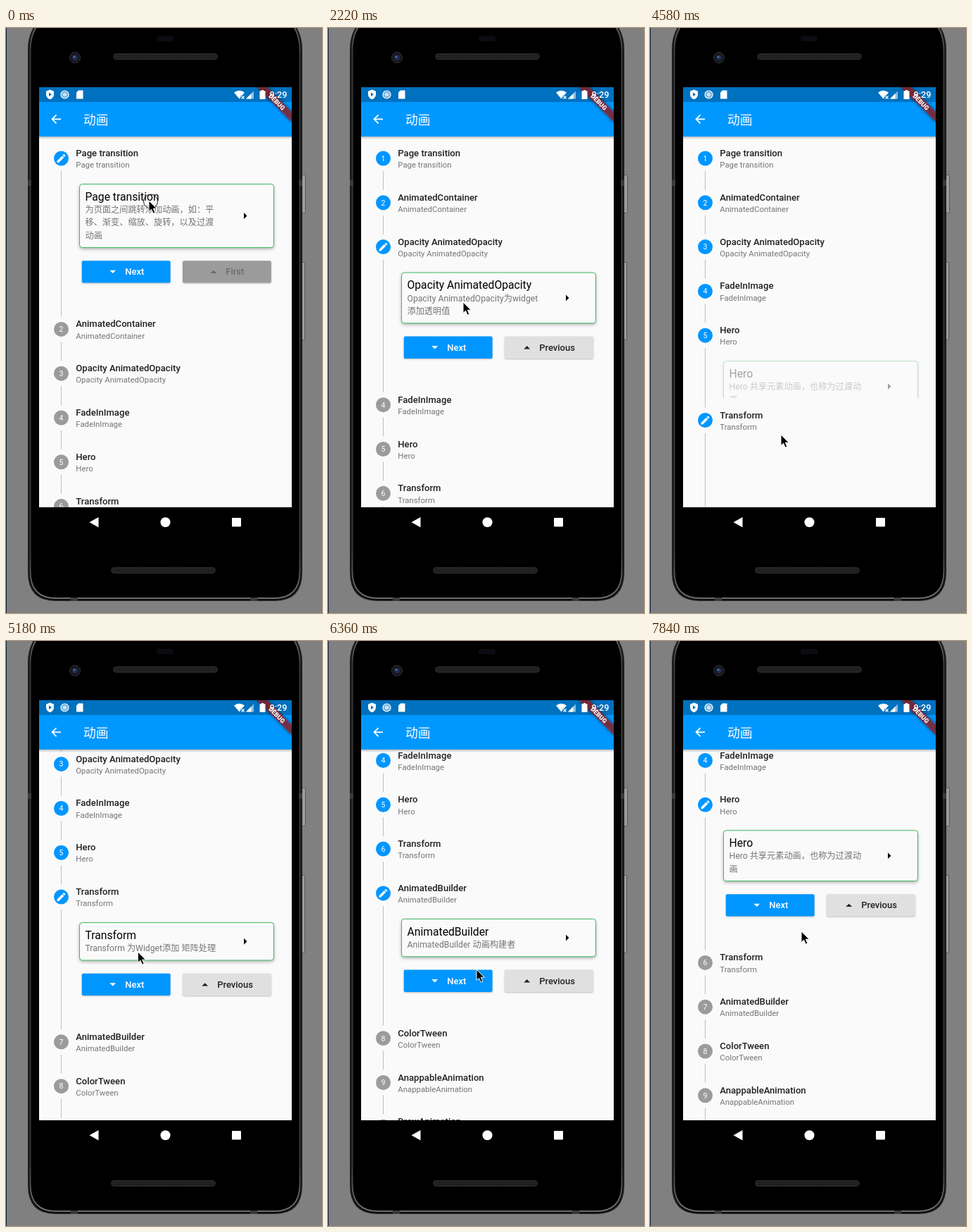
Write an HTML page that moves like this. It is 449x830 px and loops after 7990 ms.

```html
<!DOCTYPE html>
<html lang="zh-CN">
<head>
<meta charset="utf-8">
<title>Stepper</title>
<style>
  html, body { margin: 0; width: 100%; height: 100%; overflow: hidden; background: #808080; }
  svg { display: block; font-family: Roboto, 'Noto Sans CJK SC', 'Noto Sans CJK', sans-serif; }
  .head { font-size: 13.1px; font-weight: 500; fill: #212121; }
  .sub { font-size: 11.36px; fill: #757575; }
  .num { font-size: 10.5px; fill: #fff; text-anchor: middle; }
  .title { font-size: 15.7px; fill: #000; }
  .note { font-size: 12.2px; fill: #757575; }
  .label { font-size: 13px; font-weight: 500; }
  .card { fill: #fafafa; stroke: #3dba62; filter: drop-shadow(0 2px 2px rgba(0,0,0,.28)); }
  .raised { filter: drop-shadow(0 1.2px 1px rgba(0,0,0,.25)); }
  .glow { filter: blur(2.5px); }
</style>
</head>
<body>
<svg width="449" height="830" viewBox="0 0 449 830">
  <defs>
    <clipPath id="page"><rect x="47" y="154" width="359" height="526"/></clipPath>
    <clipPath id="screen"><rect x="47" y="84" width="359" height="596"/></clipPath>
    <linearGradient id="shade" x2="0" y2="1">
      <stop stop-opacity=".24"/><stop offset="1" stop-opacity="0"/>
    </linearGradient>
    <linearGradient id="rim" x2="0" y2="1">
      <stop stop-color="#6a6a6a"/><stop offset=".06" stop-color="#3c3c3c"/>
      <stop offset=".92" stop-color="#3c3c3c"/><stop offset="1" stop-color="#707070"/>
    </linearGradient>
    <pattern id="mesh" width="3" height="3" patternUnits="userSpaceOnUse">
      <rect width="3" height="3" fill="#1c1c1c"/><circle cx="1.5" cy="1.5" r=".8" fill="#333"/>
    </pattern>
  </defs>

  <!-- phone -->
  <rect width="1" height="830" fill="#14233f"/>
  <g fill="#9c9c9c" stroke="#444" stroke-width=".7">
    <rect x="420.5" y="208.5" width="5" height="54" rx="1"/>
    <rect x="420.5" y="332.5" width="4" height="110" rx="1"/>
  </g>
  <path d="M49-12Q32 5 32 30V772Q32 812 70 812H382Q420 812 420 772V30Q420 5 403-12Z" stroke="#1c1c1c" stroke-width="2"/>
  <path d="M51-12Q34.500 5 34.500 30V771Q34.500 809 71 809H381Q417.500 809 417.500 771V30Q417.500 5 401-12Z" fill="none" stroke="url(#rim)" stroke-width="2"/>
  <path d="M31 216h5v8h-5zM416 216h5v8h-5zM92 808h10v5H92zM347 808h10v5h-10z" fill="#3a3a3a"/>
  <rect x="214" y="11" width="24" height="8" rx="3" fill="#0b0b12"/>
  <g fill="url(#mesh)" stroke="#2a2a2a">
    <rect x="152.500" y="36.5" width="148" height="8" rx="4"/>
    <rect x="149.500" y="765.5" width="148" height="8" rx="4"/>
  </g>
  <circle cx="98" cy="42" r="7.500" fill="#14161c" stroke="#333"/>
  <circle cx="98" cy="42" r="4" fill="#1d2c4e"/>
  <circle cx="97" cy="41" r="1.500" fill="#5d7096"/>

  <!-- page -->
  <rect x="47" y="84" width="359" height="596" fill="#fafafa"/>
  <g id="steps" clip-path="url(#page)"></g>
  <rect x="47" y="154" width="359" height="4" fill="url(#shade)"/>

  <!-- bars -->
  <rect x="47" y="105" width="359" height="49" fill="#0098ff"/>
  <rect x="47" y="84" width="359" height="21" fill="#0071bf"/>
  <path d="M78 129.300H66M71.500 123.300L65.500 129.300L71.500 135.300" fill="none" stroke="#fff" stroke-width="1.700"/>
  <text x="110" y="136.800" font-size="17.8" font-weight="300" fill="#fff">动画</text>
  <g clip-path="url(#screen)">
    <g transform="translate(406 84) rotate(45)">
      <rect class="glow" x="-35" y="24.500" width="70" height="10.5" opacity=".5"/>
      <rect x="-35" y="24.500" width="70" height="10.5" fill="#b71c1c" opacity=".63"/>
      <text y="32.900" font-size="8.9" font-weight="900" fill="#fff" text-anchor="middle">DEBUG</text>
    </g>
  </g>
  <g fill="#fff">
    <path d="M62.500 87.500l5.500 2.300v4.200c0 3.500-2.300 6.200-5.500 7.300c-3.200-1.100-5.500-3.800-5.500-7.300v-4.200z"/>
    <path d="M61 91.500v5.400l4-2.700z" fill="#0071bf"/>
    <circle cx="83.500" cy="94.500" r="5.500" fill="#6fb2df" stroke="#fff" stroke-width="1.200"/>
    <circle cx="83.500" cy="94.500" r="2.800" fill="#c9e2f3"/>
    <path d="M103 88.500h6.500v12h-9.500v-9z"/>
    <path d="M324 91.500q7.500-5.500 15 0l-3.500 4.300h-2v2.300l-2 2.400z"/>
    <path d="M334.500 96.500l4 4m0-4l-4 4" stroke="#fff" stroke-width="1.200"/>
    <path d="M341 100.500l11-11v11z" opacity=".55"/>
    <path d="M341 100.500l7.500-7.500v7.500z"/>
    <path d="M363 88h3v1.300h2.500v11.700h-8v-11.700h2.500z"/>
    <text x="374.500" y="99.200" font-size="12.7" font-weight="500">9:29</text>
    <path d="M118.500 701.200l13-7.200v14.400z"/>
    <circle cx="226.500" cy="701.200" r="7"/>
    <rect x="321" y="695" width="13" height="12.500" rx="1"/>
  </g>

  <circle id="ring" cx="205.500" cy="246" r="10" fill="none" stroke="#222"/>
  <path id="cursor" d="M0 0V15.500L3.600 12.200L6.200 18.200L8.800 17L6.300 11.200H11.200Z" stroke="#fff" stroke-width="1"/>
</svg>
<script>
const LOOP = 7990, TICKS = 54;
const PITCH = 62.8, LINE = 18.3, FIRST_Y = 185, DRAG = 203.9;
const ANIM = 1.365; // length of an expansion, in ticks

const steps = [
  ['Page transition', '为页面之间跳转添加动画，如：平', '移、渐变、缩放、旋转，以及过渡', '动画'],
  ['AnimatedContainer', 'AnimatedContainer 为容器的', '变化添加动画'],
  ['Opacity AnimatedOpacity', 'Opacity AnimatedOpacity为widget', '添加透明值'],
  ['FadeInImage', 'FadeInImage为网络加载图片添加加', '载等待图片和加载成功图片'],
  ['Hero', 'Hero 共享元素动画，也称为过渡动', '画'],
  ['Transform', 'Transform 为Widget添加 矩阵处理'],
  ['AnimatedBuilder', 'AnimatedBuilder 动画构建者'],
  ['ColorTween', 'ColorTween 颜色动画'],
  ['AnappableAnimation', 'AnappableAnimation 动画'],
  ['DrawAnimation', 'DrawAnimation 绘制动画']
];

// [tick, step that opens]
const clicks = [[-9, 0], [7.45, 1], [13.45, 2], [19.45, 3], [25.45, 4],
  [30.45, 5], [40.45, 6], [46.45, 5], [50.45, 4]];

// [tick, x, y]
const path = [[0, 203, 245], [1, 203, 247], [5, 189, 350], [8, 189, 350], [11, 192, 389],
  [15, 192, 389], [19, 196, 452], [20, 196, 452], [22, 197, 505], [25, 197, 511],
  [29, 186, 577], [33, 186, 577], [36, 188, 373], [38, 188, 373], [40, 205, 418],
  [41, 205, 418], [43, 211, 466], [46, 283, 478], [47, 283, 478], [49, 281, 422],
  [51, 281, 422], [53, 215, 412], [54, 215, 412]];

const PEN = 'M3 17.25V21h3.75L17.81 9.94l-3.75-3.75zM20.71 7.04a1 1 0 0 0 0-1.41l-2.34-2.34a1 1 0 0 0-1.41 0l-1.83 1.83 3.75 3.75z';
const $ = id => document.getElementById(id);
const clamp = v => Math.min(1, Math.max(0, v));
const text = (cls, x, y, s, extra = '') => `<text class="${cls}" x="${x}" y="${y}" ${extra}>${s}</text>`;

function button(x, y, fill, ink, dir, arrowX, label) {
  const mid = y + 15.7;
  return `<rect class="raised" x="${x}" y="${y}" width="125.8" height="31.4" rx="2" fill="${fill}"/>
    <path d="M${arrowX - 4.4} ${mid - dir * 2.2}h8.800l-4.400 ${dir * 4.4}z" fill="${ink}"/>` +
    text('label', arrowX + 17.5, mid + 4.5, label, `fill="${ink}"`);
}

function body(i, y, height, alpha) {
  const [title, ...notes] = steps[i];
  const top = y + 36.5, tall = 53.4 + LINE * (notes.length - 1), mid = top + tall / 2;
  const row = top + tall + 18.7;
  return `<clipPath id="clip${i}"><rect x="47" y="${y + 31.4}" width="359" height="${height}"/></clipPath>
    <g clip-path="url(#clip${i})"><g opacity="${alpha}">
    <rect class="card" x="104.500" y="${top}" width="276" height="${tall}" rx="4"/>
    <path d="M338 ${mid - 4.4}v8.800l4.400-4.400z"/>` +
    text('title', 112.5, top + 23.2, title) +
    notes.map((s, n) => text('note', 112.5, top + 40.5 + n * LINE, s)).join('') +
    button(107.8, row, '#0096ff', '#fff', 1, 151.7, 'Next') +
    (i ? button(251, row, '#e0e0e0', '#212121', -1, 282.7, 'Previous')
       : button(251, row, '#9b9b9b', '#6c6c6c', -1, 294.8, 'First')) + '</g></g>';
}

function header(i, y, active) {
  const mark = i === active
    ? `<path transform="translate(${78.5 - 7.86} ${y - 7.86}) scale(.655)" d="${PEN}" fill="#fff"/>`
    : text('num', 78.5, y + 3.8, i + 1);
  return `<circle cx="78.500" cy="${y}" r="10.5" fill="${i > active ? '#9b9b9b' : '#0096ff'}"/>` + mark +
    text('head', 99.3, y - 3, steps[i][0]) + text('sub', 99.3, y + 13.2, steps[i][0]);
}

function drawSteps(tick) {
  const n = clicks.findLastIndex(c => c[0] <= tick);
  const active = clicks[n][1], last = n ? clicks[n - 1][1] : -1;
  const x = clamp((tick - clicks[n][0]) / ANIM), grown = 1 - (1 - x) ** 2;
  let y = FIRST_Y - DRAG * clamp((tick - 33) / 3), out = '';
  steps.forEach((s, i) => {
    const open = i === active ? grown : i === last ? 1 - grown : 0;
    const height = open * (143 + LINE * (s.length - 2));
    const next = y + PITCH + height;
    out += `<rect x="78" y="${y + 18}" width="1" height="${next - y - 36}" fill="#bdbdbd"/>` + header(i, y, active);
    if (open) out += body(i, y, height, i === active ? clamp((x - .41) / .59) : open);
    y = next;
  });
  $('steps').innerHTML = out;
}

function drawCursor(tick) {
  const n = path.findIndex(p => p[0] > tick);
  const [t0, x0, y0] = path[n - 1], [t1, x1, y1] = path[n];
  const f = (tick - t0) / (t1 - t0);
  $('cursor').setAttribute('transform', `translate(${x0 + (x1 - x0) * f} ${y0 + (y1 - y0) * f})`);
  $('ring').style.display = tick ? 'none' : '';
}

let shown = -1;
function frame() {
  const tick = Math.floor((performance.now() % LOOP) / LOOP * TICKS + .05) % TICKS;
  if (tick !== shown) {
    shown = tick;
    drawSteps(tick);
    drawCursor(tick);
  }
  requestAnimationFrame(frame);
}
frame();
</script>
</body>
</html>
```
